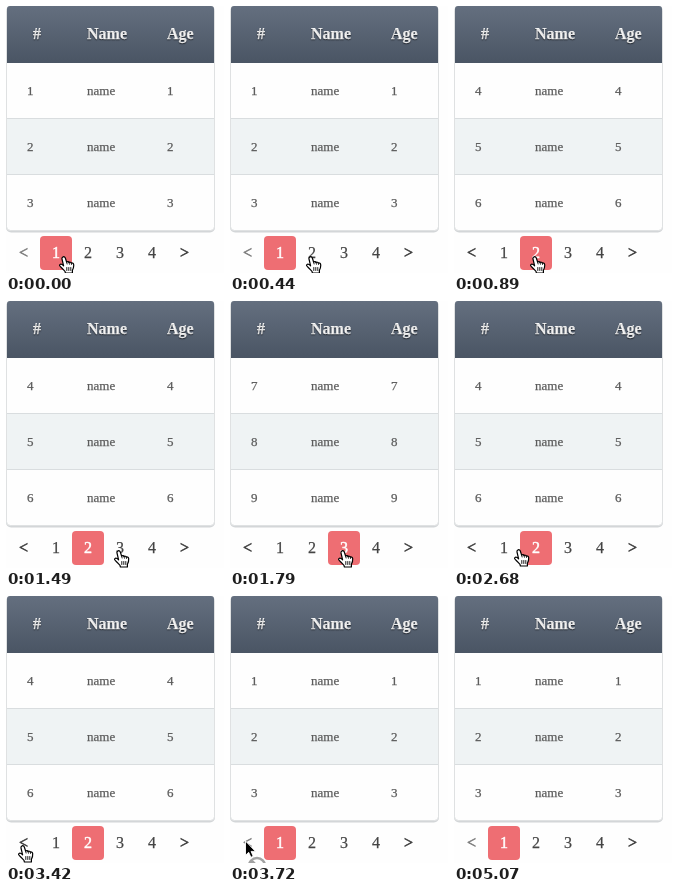
Write an HTML page that moves like this. It is 218 by 267 pixels and loops after 5950 ms.

```html
<!DOCTYPE html>
<html lang="en">
<head>
<meta charset="utf-8">
<title>Paged table</title>
<style>
html, body { margin: 0; width: 100%; height: 100%; overflow: hidden; background: #fefefe; }
svg { display: block; font: 13px "Liberation Serif", "Times New Roman", serif; }
text { fill: currentColor; stroke: currentColor; stroke-width: .25px; }
.head { font-size: 16px; font-weight: bold; color: #fafafa; text-shadow: 0 1px 1px rgba(0,0,0,.5); }
.cell { color: #5c5c5c; }
.link { font-size: 16px; color: #444; }
.arrow { stroke-width: .6px; }
.off { color: #808080; }
.on { color: #fff; stroke-width: .5px; }
</style>
</head>
<body>
<svg width="218" height="267" viewBox="0 0 218 267">
  <defs>
    <linearGradient id="slate" x2="0" y2="1">
      <stop stop-color="#646f7f"/><stop offset="1" stop-color="#4a5564"/>
    </linearGradient>
    <path id="ban" d="M19 270a8 8 0 1 1 16 0a8 8 0 1 1-16 0M21.3 264.3L32.7 275.7"/>
  </defs>
  <rect y="1" width="209" height="225.5" rx="5" fill="#d3d6d8"/>
  <rect x=".5" y=".5" width="208" height="224" rx="4" fill="#fefefe" stroke="#dfe1e2"/>
  <path fill="#eff3f4" d="M1 113H208V168H1Z"/>
  <path stroke="#d9dddf" d="M1 112.5H208M1 168.5H208"/>
  <path fill="url(#slate)" d="M1 57V3Q1 0 4 0H205Q208 0 208 3V57Z"/>
  <g id="labels"></g>
  <rect id="active" y="230" width="32" height="34" rx="4" fill="#ee6e73"/>
  <g id="pager"></g>
  <g id="hand" stroke="#000" stroke-width="1.2" stroke-linejoin="round" stroke-linecap="round">
    <path fill="#fff" d="M3.6 1.2C4.8.2 6 .9 6.4 2.2L7.6 6C8.4 5.4 9.6 5.6 10 6.4C11 5.9 12 6.2 12.3 7C13.6 6.6 14.6 7.4 14.7 8.8C14.9 11 14.3 12.6 13.4 14.2V17H6.4L6 15.4C4.6 14 3.4 12.4 2 11.2C.4 9.9.3 9.2.9 8.6C1.8 7.8 3.4 8.6 4.6 9.8L3 3C2.8 2.2 3 1.6 3.6 1.2Z"/>
    <path stroke-width=".9" d="M7.6 6l.5 2M10 6.4l.4 1.8M12.3 7l.2 1.4M7.8 11.5v3m2-3v3m2-3v3"/>
  </g>
  <g id="blocked" stroke="#fff">
    <g fill="none">
      <use href="#ban" stroke-width="5"/>
      <use href="#ban" stroke="#a2a2a2" stroke-width="2.6"/>
    </g>
    <path stroke-width=".9" d="M15.5 245V259.3L18.7 256.3L20.9 261.3L23.2 260.3L21.1 255.4H25.5Z"/>
  </g>
</svg>
<script>
const $ = id => document.getElementById(id);

function label(parent, cls, x, y, str = "") {
  const t = document.createElementNS("http://www.w3.org/2000/svg", "text");
  t.setAttribute("class", cls);
  t.setAttribute("x", x);
  t.setAttribute("y", y);
  t.textContent = str;
  return $(parent).appendChild(t);
}

label("labels", "head", 27, 33, "#");
label("labels", "head", 81, 33, "Name");
label("labels", "head", 161, 33, "Age");
const rows = [0, 1, 2].map(i => {
  const y = 89 + 56 * i;
  label("labels", "cell", 81, y, "name");
  return [21, 161].map(x => label("labels", "cell", x, y));
});
const links = [..."<1234>"].map((c, i) => label("pager", "link", i ? 14 + 32 * i : 13, 252, c));

const LOOP = 5950, STEPS = 40;

// Where the hand starts and stops: [step, x, y]
const stops = [
  [0, 53, 250], [3.2, 76, 250], [8, 76, 250], [10, 108, 249], [12, 108, 249],
  [15, 71, 248], [17, 71, 248], [18, 60, 248], [22.5, 12, 249], [25, 12, 249], [33, 117, 242]
];

function handAt(step) {
  const i = stops.findLastIndex(s => s[0] <= step);
  const [t0, x0, y0] = stops[i], [t1, x1, y1] = stops[i + 1] || [step + 1, x0, y0];
  const u = (step - t0) / (t1 - t0), ease = u * u * (3 - 2 * u);
  return [x0 + (x1 - x0) * ease, y0 + (y1 - y0) * ease].map(Math.round);
}

const show = (id, on) => $(id).setAttribute("visibility", on ? "visible" : "hidden");

function draw(t) {
  // The pointer moves in even steps, each beginning on a 10 ms tick
  const step = Math.floor((t + 9) * STEPS / LOOP) % STEPS;
  const page = 1 + (step >= 6 && step < 25) + (step >= 12 && step < 18);

  rows.forEach((row, i) => row.forEach(c => c.textContent = page * 3 - 2 + i));
  links.forEach((link, i) => {
    link.classList.toggle("arrow", i % 5 === 0);
    link.classList.toggle("on", i === page);
    link.classList.toggle("off", i === 0 && page === 1);
  });
  $("active").setAttribute("x", 2 + 32 * page);

  $("hand").setAttribute("transform", `translate(${handAt(step)})`);
  show("hand", step < 25 || step === 33);
  show("blocked", step >= 25 && step < 33);
}

const start = performance.now();
function tick(now) {
  draw(Math.max(0, now - start) % LOOP);
  requestAnimationFrame(tick);
}
draw(0);
requestAnimationFrame(tick);
</script>
</body>
</html>
```
